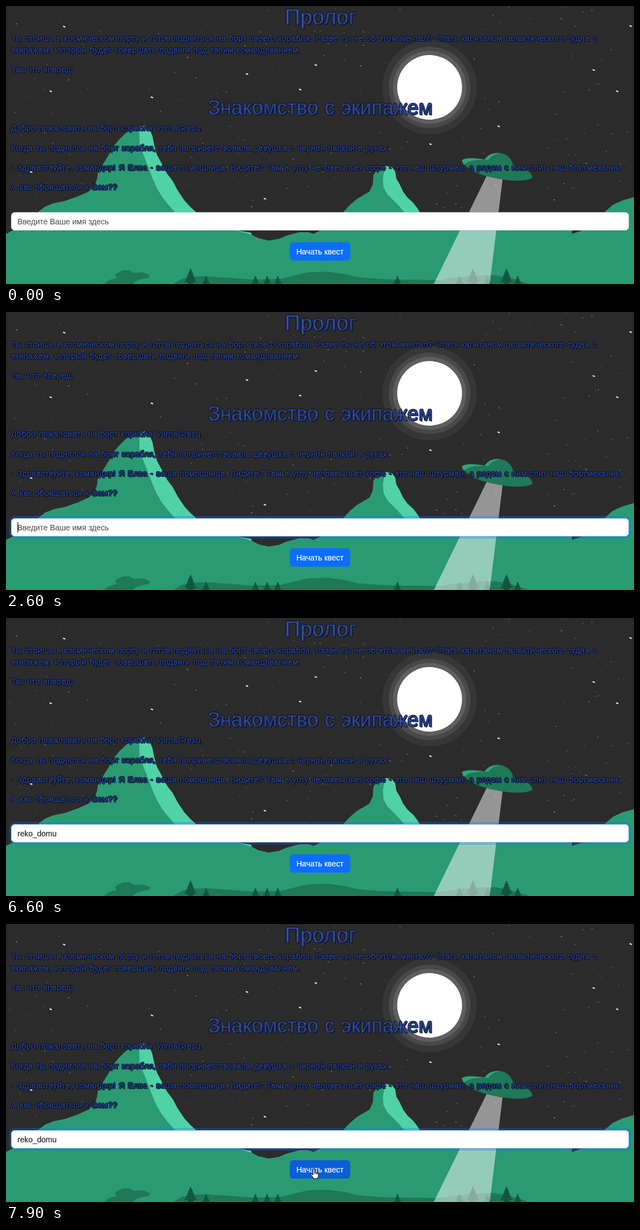
These frames come from a looping animation (1123 by 499 pixels, 8 s). An HTML page:

```html
<!DOCTYPE html>
<html lang="ru">
<head>
<meta charset="utf-8">
<style>
  html, body { margin: 0; width: 100%; height: 100%; overflow: hidden; background: #2b2b2b; }
  svg { display: block; width: 1123px; height: 499px; font-family: "Liberation Sans", Arial, sans-serif; }
  .story text {
    font-size: 15px; word-spacing: 1.3px; fill: #4169e1; stroke: #4169e1; stroke-width: .45px;
    text-shadow: 1px 1px #000, -1px 0 #000, 0 -1px #000;
  }
  .story .title { text-anchor: middle; word-spacing: 1px; }
  .form text { font-size: 14px; stroke: currentColor; stroke-width: .2px; fill: currentColor; }
</style>
</head>
<body>
<svg viewBox="0 0 1123 499" xmlns="http://www.w3.org/2000/svg">
  <rect width="1123" height="499" fill="#2b2b2b"/>
  <g id="stars"></g>

  <g id="moon">
    <circle cx="757.5" cy="146" r="84.5" fill="#363636"/>
    <circle cx="757.5" cy="146" r="73" fill="#484848"/>
    <circle cx="757.5" cy="146" r="65.5" fill="#5e5e5e"/>
    <circle cx="757.5" cy="146" r="58" fill="#fff"/>
  </g>

  <g id="land" fill="#2a9a73">
    <path d="M0 409L12 403 57 370 70 360 85 354 105 350 128 342 148 333 159 321 163 310 164 300 171 288 179 275 187 262 193 251 202 240 212 230 224 221 238 216
      L302 370 412 403 440 411 452 417 470 421 488 418 502 412 525 406 540 406 550 409 562 403
      L603 370 615 357 628 346 640 339 650 333 656 320 657 303 663 295 670 290 678 287L712 370 800 403H1012V409L1030 403 1070 370 1085 357 1102 349 1123 343V499H0Z"/>
    <g fill="#50d2a6">
      <path d="M238 216L248 214 256 219 262 234 265 250 270 267 279 284 288 301 298 314 307 331 319 349 330 361 340 370 415 403 438 407 440 411 412 403
        L302 370 289 355 278 341 269 325 262 309 255 290 247 270 239 250Z"/>
      <path d="M678 287L690 289 696 297 698 310 704 320 710 333 718 344 728 353 735 362 740 370H712L702 358 692 348 682 338 675 325 674 309Z"/>
    </g>
    <g fill="#1f7858">
      <path d="M175 499L184 492 198 488 195 483 200 476 210 472 220 474 229 479 245 478 257 483 256 488 243 490 232 494 226 499Z"/>
      <path d="M300 499L314 490 330 486 355 485 400 488 440 491 490 490 515 484 540 478 575 477 605 481 630 487 670 490 700 491 775 492 800 488 840 484 875 483 905 489 935 499Z"/>
    </g>
    <path d="M196 481L201 475 211 471 222 474 208 475Z"/>
    <g id="trees" fill="#11563f"></g>
  </g>

  <g id="saucer">
    <path d="M860 304L888 311 865 499H765Z" fill="#fff" opacity=".5"/>
    <path d="M856 275Q866 262 884 264 904 267 908 290L857 286Z" fill="#1f7858"/>
    <path d="M856 275Q866 262 884 264 869 266 862 277Z" fill="#2da67c"/>
    <path d="M815 277Q824 270 858 276 909 283 931 294 943 303 941 309 925 317 885 311 825 301 815 277Z" fill="#1f7858"/>
    <path d="M815 277Q824 270 858 276 828 275 819 285Z" fill="#2da67c"/>
  </g>

  <g class="story">
    <text class="title" x="562.5" y="33" style="font-size:38.5px">Пролог</text>
    <text x="9" y="63">Ты стоишь в космическом порту и готов подняться на борт своего корабля. Разве ты не об этом мечтал? Стать капитаном галактического судна с</text>
    <text x="9" y="84">экипажем, который будет совершать подвиги под твоим командованием.</text>
    <text x="9" y="119">Так что вперед!</text>
    <text class="title" x="562" y="195" style="font-size:36.3px">Знакомство с экипажем</text>
    <text x="9" y="224">Добро пожаловать на борт корабля VornaGresu.</text>
    <text x="9" y="260">Когда ты поднялся на борт корабля, тебя поприветствовала девушка с черной папкой в руках:</text>
    <text x="9" y="295">- Здравствуйте, командир! Я Елва - ваша помощница. Видите? Там в углу человек пьет кофе - это наш штурман, а рядом с ним спит наш бортмеханик.</text>
    <text x="9" y="330">А как обращаться к Вам??</text>
  </g>

  <g class="form">
    <rect id="ring" x="7.5" y="368" width="1108" height="37" rx="8" fill="none" stroke="#0d6efd" stroke-opacity=".27" stroke-width="4"/>
    <rect id="field" x="9.5" y="370.5" width="1104" height="32" rx="6" fill="#fff"/>
    <text id="hint" x="20.5" y="392" color="#595c5f">Введите Ваше имя здесь</text>
    <text id="value" x="20.5" y="392" color="#212529"></text>
    <rect id="caret" y="377" width="1.2" height="19" fill="#111"/>
    <rect id="button" x="507.5" y="424" width="108" height="33" rx="6"/>
    <text x="561.5" y="446" text-anchor="middle" color="#fff">Начать квест</text>
  </g>

  <g id="cursor">
    <path id="arrow" d="M0 0V16L4 12.5 6.5 18 9 17 6.5 11.5H11.5Z" fill="#fff" stroke="#000"/>
    <path id="beam" d="M-3.5-8.5H-1L0-7.5 1-8.5H3.5M0-7.5V7.5M-3.5 8.5H-1L0 7.5 1 8.5H3.5" fill="none" stroke="#111"/>
    <path id="hand" d="M-2 1Q-2-.5-.5-.5T1 1V6Q2 5 3.3 6.3 4.6 5.3 5.5 7 7.5 6 7.7 8.5V12Q7.5 14 6 17H-1Q-2 14-5.5 10.5-6.5 8.5-4.5 8.5L-2 10.5ZM1 6V9M3.3 6.5V9M5.5 7V9.5" fill="#fff" stroke="#000"/>
  </g>
</svg>
<script>
const $ = id => document.getElementById(id);
const LOOP = 8000, STEP = 100;
const NAME = 'reko_domu';
// The click on the field, then every key press; each one restarts the caret blink.
const ACTIONS = [1600, 3000, 3200, 3400, 3600, 5200, 5600, 5700, 5900, 6100];
// Pointer stops: time, x, y
const ENTER = [[300, 27, 11], [600, 55, 110], [900, 126, 325], [1100, 142, 369], [1400, 142, 381]];
const LEAVE = [[6800, 142, 381], [6900, 255, 398], [7000, 412, 420], [7100, 508, 431], [7300, 541, 438], [7500, 546, 439], [7900, 551, 440]];

const clamp = v => Math.max(0, Math.min(1, v));
const show = (id, on) => $(id).setAttribute('visibility', on ? 'visible' : 'hidden');
const mix = (a, b, k) => `rgb(${a.map((v, i) => Math.round(v + (b[i] - v) * k))})`;

function random(seed) {
  return () => (seed = (seed * 16807) % 2147483647) / 2147483647;
}

function drawStars() {
  const rnd = random(4217);
  const dash = (x, y, len, width, alpha) =>
    `<path d="M${x - len} ${y - len * .4}l${len * 2} ${len * .8}" stroke="#fff" stroke-width="${width}" opacity="${alpha}"/>`;
  const bright = [[104, 37], [554, 106], [431, 122], [80, 153], [1093, 153], [881, 216], [1117, 36],
    [261, 164], [759, 248], [463, 346], [660, 332], [526, 150], [1051, 115], [45, 298]];
  let out = bright.map(([x, y]) => dash(x, y, 2, 2, .9)).join('');
  for (let i = 0; i < 260; i++) {
    out += dash(rnd() * 1123, rnd() * 400, .5 + rnd() * .8, .7 + rnd() * .6, .15 + rnd() * .4);
  }
  $('stars').innerHTML = out;
}

// Every tree has the same size; the lower ones are cut off by the bottom edge.
function drawTrees() {
  const tree = (x, y) => {
    const right = [], left = [];
    for (let i = 1; i <= 5; i++) {
      const base = y + i * 5;
      right.push(`${x + i * 2.5} ${base}`, `${x + i * 1.4} ${base - 1}`);
      left.unshift(`${x - i * 1.4} ${base - 1}`, `${x - i * 2.5} ${base}`);
    }
    return `<path d="M${x} ${y}L${right.join(' ')} ${x + 2} ${y + 30} ${x - 2} ${y + 30} ${left.join(' ')}Z"/>`;
  };
  const tall = [330, 835, 895].map(x => tree(x, 471));
  const low = [358, 446, 467, 486, 700, 811, 861, 915].map(x => tree(x, 484));
  $('trees').innerHTML = tall.concat(low).join('');
}

function along(stops, t) {
  const i = stops.findIndex(s => s[0] > t);
  if (i < 0) return stops[stops.length - 1].slice(1);
  const a = stops[i - 1], b = stops[i], k = (t - a[0]) / (b[0] - a[0]);
  return [a[1] + (b[1] - a[1]) * k, a[2] + (b[2] - a[2]) * k];
}

function updateCursor(t) {
  const entering = t >= 300 && t < 1600, leaving = t >= 6800;
  let shape = '';
  if (entering || leaving) {
    const [x, y] = along(entering ? ENTER : LEAVE, t);
    $('cursor').setAttribute('transform', `translate(${x} ${y})`);
    const overField = y > 367 && y < 403;
    shape = t >= 7100 ? 'hand' : overField ? 'beam' : 'arrow';
  }
  ['arrow', 'beam', 'hand'].forEach(id => show(id, id === shape));
}

function update(time) {
  const t = Math.floor(time / STEP) * STEP;
  const past = ACTIONS.filter(a => a <= t);
  const typed = NAME.slice(0, Math.max(0, past.length - 1));
  const value = $('value');
  value.textContent = typed;
  show('hint', !typed);

  const blink = Math.floor((t - past[past.length - 1]) / 500) % 2 === 0;
  show('caret', past.length > 0 && blink);
  $('caret').setAttribute('x', 20.5 + (typed ? value.getComputedTextLength() : 0));

  const focus = t < 1600 ? 0 : t < 1700 ? .25 : 1;
  $('ring').setAttribute('opacity', focus);
  $('field').setAttribute('stroke', mix([206, 212, 218], [134, 183, 254], focus));
  $('button').setAttribute('fill', mix([13, 110, 253], [11, 94, 215], clamp((t - 7100) / 150)));
  updateCursor(t);
}

drawStars();
drawTrees();
const start = performance.now();
function tick() {
  update((performance.now() - start) % LOOP);
  requestAnimationFrame(tick);
}
tick();
</script>
</body>
</html>
```
